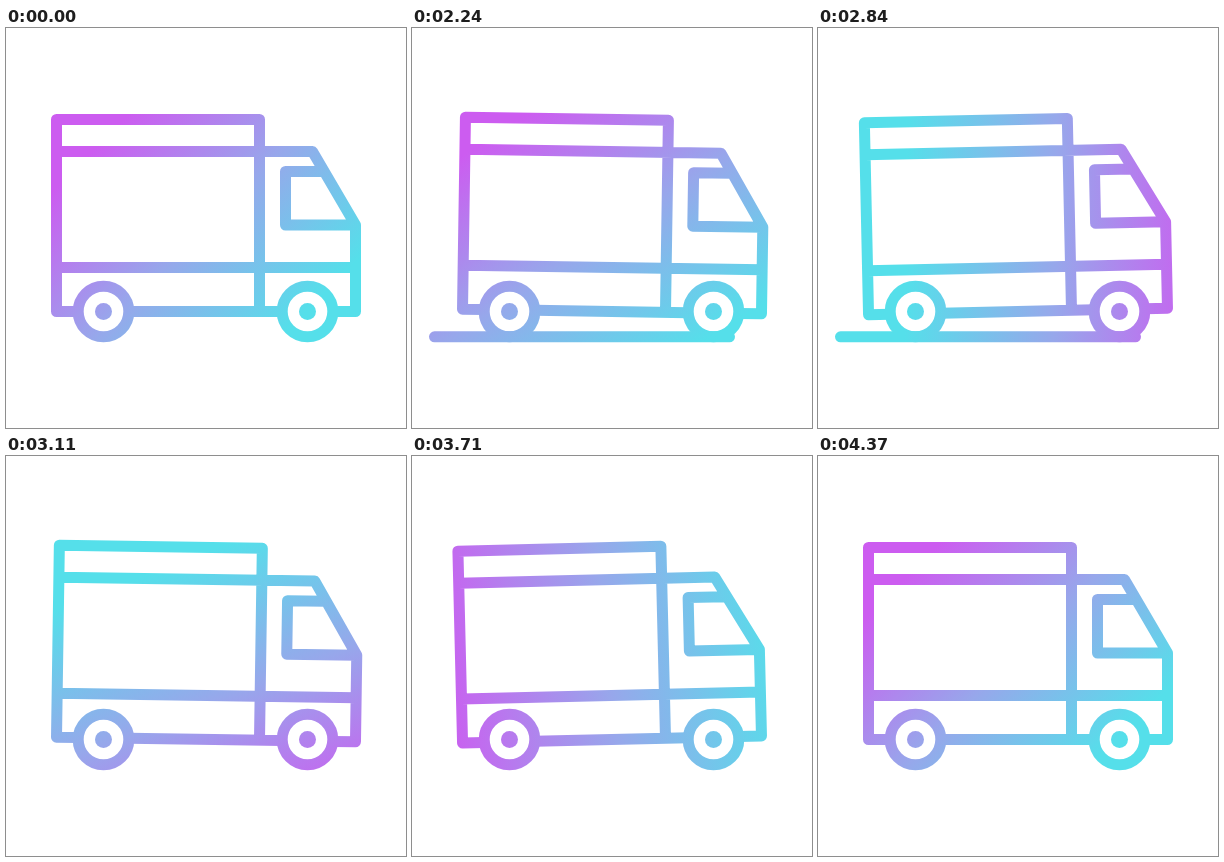
Write an HTML page that moves like this. It is 400 px wide and 400 px high and loops after 4.49 s.

```html
<!DOCTYPE html>
<html lang="en">
<head>
<meta charset="utf-8">
<title>Delivery truck</title>
<style>
  html, body { margin: 0; width: 100%; height: 100%; overflow: hidden; background: #fff; }
  svg { display: block; width: 100%; height: 100%; }
  .ink { fill: none; stroke: url(#tint); stroke-width: 11; stroke-linecap: round; stroke-linejoin: round; }
  .hub { fill: url(#tint); stroke: none; }
</style>
</head>
<body>
<svg viewBox="0 0 400 400">
  <defs>
    <linearGradient id="tint" gradientUnits="userSpaceOnUse">
      <stop offset="0" stop-color="#cc5cf0"/>
      <stop offset=".5" stop-color="#97a7eb"/>
      <stop offset="1" stop-color="#55dfea"/>
    </linearGradient>
  </defs>
  <g class="ink">
    <path id="road"/>
    <g id="body" stroke-linecap="butt">
      <path d="M72 283.5H50.5V91.5H253.5V283.5M123 283.5H276M327 283.5H349.5V197L306.5 123.5H50.5M50.5 239.5H349.5M349.5 197H279.5V143.5H317"/>
    </g>
    <g id="wheels">
      <circle cx="97.5" cy="283.5" r="25.3"/>
      <circle cx="301.5" cy="283.5" r="25.3"/>
      <circle class="hub" cx="97.5" cy="283.5" r="8.5"/>
      <circle class="hub" cx="301.5" cy="283.5" r="8.5"/>
    </g>
  </g>
</svg>
<script>
  const LOOP = 4490, REST = 2030, STEP = 30, LAST = 78;
  const el = id => document.getElementById(id);
  const tint = el('tint'), body = el('body'), road = el('road');

  // Keys are [step, value, ...]; motion runs from step 0 to LAST.
  const rock = [[0, 0], [9, 1], [25, -1.4], [38, 1], [55, -1.4], [70, 0], [78, 0]];
  const sweep = [ // angle of the purple end, its distance, distance of the cyan end
    [0, -135, 135, 130], [14, -95, 158, 162], [27, 2, 190, 110],
    [36, 68, 187, 98], [56, 175, 177, 172], [78, 225, 135, 130]
  ];

  // Slope at key i: flat at the ends and at turning points.
  function slope(keys, i, c) {
    const a = keys[i - 1], b = keys[i], d = keys[i + 1];
    if (!a || !d || (b[c] - a[c]) * (d[c] - b[c]) <= 0) return 0;
    return (d[c] - a[c]) / (d[0] - a[0]);
  }

  function track(keys, k, c = 1) {
    let i = 0;
    while (i < keys.length - 2 && k >= keys[i + 1][0]) i++;
    const [a, b] = [keys[i], keys[i + 1]];
    const h = b[0] - a[0], u = (k - a[0]) / h, v = 1 - u;
    return v * v * (1 + 2 * u) * a[c] + u * u * (3 - 2 * u) * b[c]
      + h * u * v * (v * slope(keys, i, c) - u * slope(keys, i + 1, c));
  }

  function drawRoad(k, moving) {
    const front = 400.5 - 54 * (k % 20), tail = front + 295;
    const shown = moving && k < 60 && tail > -6;
    road.setAttribute('d', shown ? `M${front} 308.8H${tail}` : '');
  }

  function drawTint(k) {
    const a = track(sweep, k) * Math.PI / 180;
    const put = (n, r) => {
      tint.setAttribute('x' + n, 200 + r * Math.cos(a));
      tint.setAttribute('y' + n, 200 + r * Math.sin(a));
    };
    put(1, track(sweep, k, 2));
    put(2, -track(sweep, k, 3));
  }

  function draw(ms) {
    const moving = ms >= REST;
    const k = moving ? Math.min(LAST, Math.floor((ms - REST) / STEP)) : 0;
    body.setAttribute('transform', `rotate(${track(rock, k)} 200 283)`);
    drawRoad(k, moving);
    drawTint(k);
  }

  const start = performance.now();
  function tick() {
    draw((performance.now() - start) % LOOP);
    requestAnimationFrame(tick);
  }
  tick();
</script>
</body>
</html>
```
